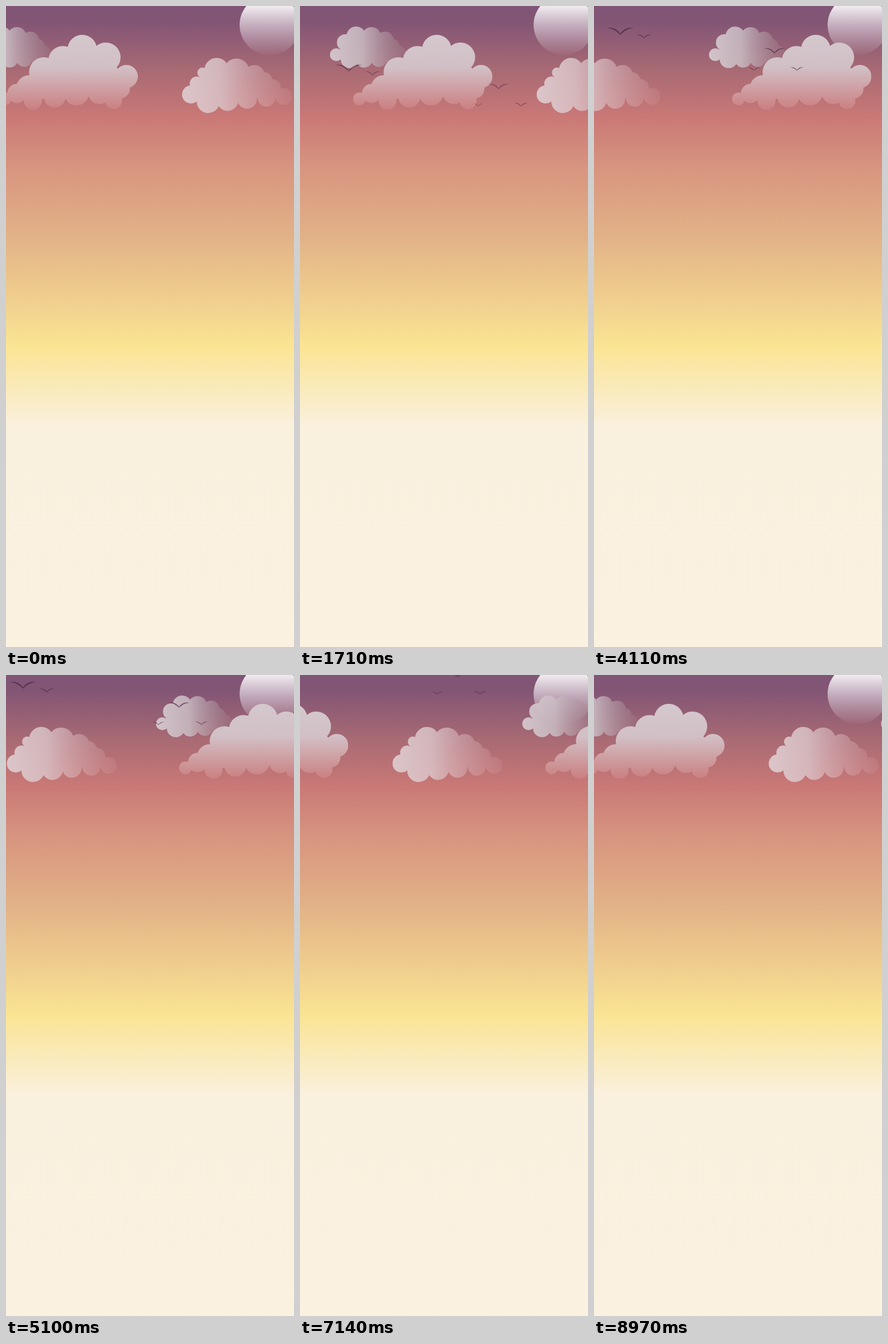
Animation of 450x1000 px, one loop 9000 ms. Source, as an HTML page:

```html
<!DOCTYPE html>
<html lang="en">
<head>
<meta charset="utf-8">
<title>Evening sky</title>
<style>
  html, body { margin: 0; width: 100%; height: 100%; overflow: hidden; background: #faf1e0; }
  svg { display: block; width: 100vw; height: 100vh; }
</style>
</head>
<body>
<svg viewBox="0 0 450 1000" preserveAspectRatio="none">
  <defs id="defs">
    <linearGradient id="air" x2="0" y2="1">
      <stop offset="0" stop-color="#815576"/>
      <stop offset=".024" stop-color="#825575"/>
      <stop offset=".1" stop-color="#a86a74"/>
      <stop offset=".172" stop-color="#c97876"/>
      <stop offset=".25" stop-color="#d7947f"/>
      <stop offset=".36" stop-color="#e2b287"/>
      <stop offset=".53" stop-color="#fae493"/>
      <stop offset=".655" stop-color="#faf0de"/>
      <stop offset="1" stop-color="#faf1e0"/>
    </linearGradient>
    <linearGradient id="glow" gradientUnits="userSpaceOnUse" x1="0" y1="-14" x2="0" y2="77">
      <stop offset=".15" stop-color="#f1ecf0"/>
      <stop offset="1" stop-color="#e4d8e2" stop-opacity=".03"/>
    </linearGradient>
    <linearGradient id="bigFill" gradientUnits="userSpaceOnUse" x1="0" y1="45" x2="0" y2="162">
      <stop offset="0" stop-color="#d4c8cd"/>
      <stop offset=".43" stop-color="#d1c0c6"/>
      <stop offset="1" stop-color="#cb7f80"/>
    </linearGradient>
    <linearGradient id="midFill" gradientUnits="userSpaceOnUse" x1="275" y1="0" x2="448" y2="0">
      <stop offset="0" stop-color="#decdd1" stop-opacity=".92"/>
      <stop offset=".35" stop-color="#dcc8cc" stop-opacity=".8"/>
      <stop offset="1" stop-color="#d8a0a6" stop-opacity=".16"/>
    </linearGradient>
    <linearGradient id="smallFill" gradientUnits="userSpaceOnUse" x1="-48" y1="0" x2="80" y2="0">
      <stop offset="0" stop-color="#d6cbd0" stop-opacity=".93"/>
      <stop offset=".4" stop-color="#cabdc4" stop-opacity=".85"/>
      <stop offset="1" stop-color="#95707f" stop-opacity=".3"/>
    </linearGradient>
    <path id="bird" d="M-21-10Q-8-12.5 0-1.5Q8-12.5 21-10Q9-9.5 .5 0H-.5Q-9-9.5-21-10Z"/>
  </defs>
  <rect width="450" height="1000" fill="url(#air)"/>
  <circle cx="412" cy="29.5" r="47" fill="url(#glow)"/>
  <g id="clouds"></g>
  <g id="birds" fill="#45243f"></g>
</svg>
<script>
const LOOP = 9000;
const OUT = 498, IN = 632;
const $ = id => document.getElementById(id);

function add(parent, tag, attrs = {}) {
  const el = document.createElementNS('http://www.w3.org/2000/svg', tag);
  for (const k in attrs) el.setAttribute(k, attrs[k]);
  return parent.appendChild(el);
}

const move = (el, x, y = 0) => el.setAttribute('transform', `translate(${x.toFixed(2)} ${y.toFixed(2)})`);

// Key puffs [x, y, r, extra], clockwise from the left tip;
// "extra" puffs are spread evenly on the way to the next key.
const outlines = {
  small: [[-38, 76, 10], [-24, 57, 13], [-7, 47, 15], [17, 48, 15], [38, 54, 14, 1], [60, 72, 10],
          [73, 75, 7], [51, 82, 12, 2], [-17, 83, 14]],
  mid: [[289, 138, 14, 1], [307, 104, 8], [329, 100, 19], [360, 102, 20], [388, 108, 16, 1],
        [416, 127, 13], [434, 141, 13], [407, 143, 14, 2], [316, 149, 18]],
  big: [[-2, 145, 10, 1], [36, 128, 20], [59, 103, 23, 1], [119, 68, 23], [156, 80, 23],
        [188, 110, 18, 1], [168, 148, 13], [146, 135, 18], [110, 135, 20, 1], [42, 148, 14]]
};

const puffsOf = keys => keys.flatMap(([x, y, r, extra = 0], i) => {
  const [nx, ny, nr] = keys[(i + 1) % keys.length];
  return Array.from({ length: extra + 1 }, (_, k) => {
    const f = k / (extra + 1);
    return { cx: x + (nx - x) * f, cy: y + (ny - y) * f, r: r + (nr - r) * f };
  });
});

function makeCloud([name, keys]) {
  const clip = add($('defs'), 'clipPath', { id: name });
  const puffs = puffsOf(keys);
  for (const puff of puffs) add(clip, 'circle', puff);
  add(clip, 'polygon', { points: puffs.map(p => `${p.cx},${p.cy}`).join(' ') });
  const copy = () => {
    const g = add($('clouds'), 'g');
    add(g, 'rect', { x: -60, y: 25, width: 520, height: 150, fill: `url(#${name}Fill)`, 'clip-path': `url(#${name})` });
    return g;
  };
  return { leaving: copy(), coming: copy() };
}
const clouds = Object.entries(outlines).map(makeCloud);

// Start point, speed in px/ms and members as [dx, dy, scale].
const flocks = [
  { x: 101.5, y: 142.8, vx: -.0147, vy: -.0239, members: [[0, 0, 1], [37, 6, .57]] },
  { x: 330.5, y: 169.2, vx: -.0118, vy: -.0232, members: [[0, 0, .77], [-32, 27, .44], [35, 27, .5]] }
];
for (const f of flocks) {
  f.el = add($('birds'), 'g');
  for (const [x, y, s] of f.members)
    add(f.el, 'use', { href: '#bird', transform: `translate(${x} ${y}) scale(${s})` });
}

function draw(t) {
  const p = t / LOOP;
  for (const { leaving, coming } of clouds) {
    move(leaving, OUT * p);
    move(coming, IN * (p - 1));
  }
  for (const f of flocks) move(f.el, f.x + f.vx * t, f.y + f.vy * t);
  $('birds').setAttribute('opacity', (.72 * Math.sqrt(Math.sin(Math.PI * p))).toFixed(3));
}

const start = performance.now();
function tick() {
  draw((performance.now() - start) % LOOP);
  requestAnimationFrame(tick);
}
tick();
</script>
</body>
</html>
```
